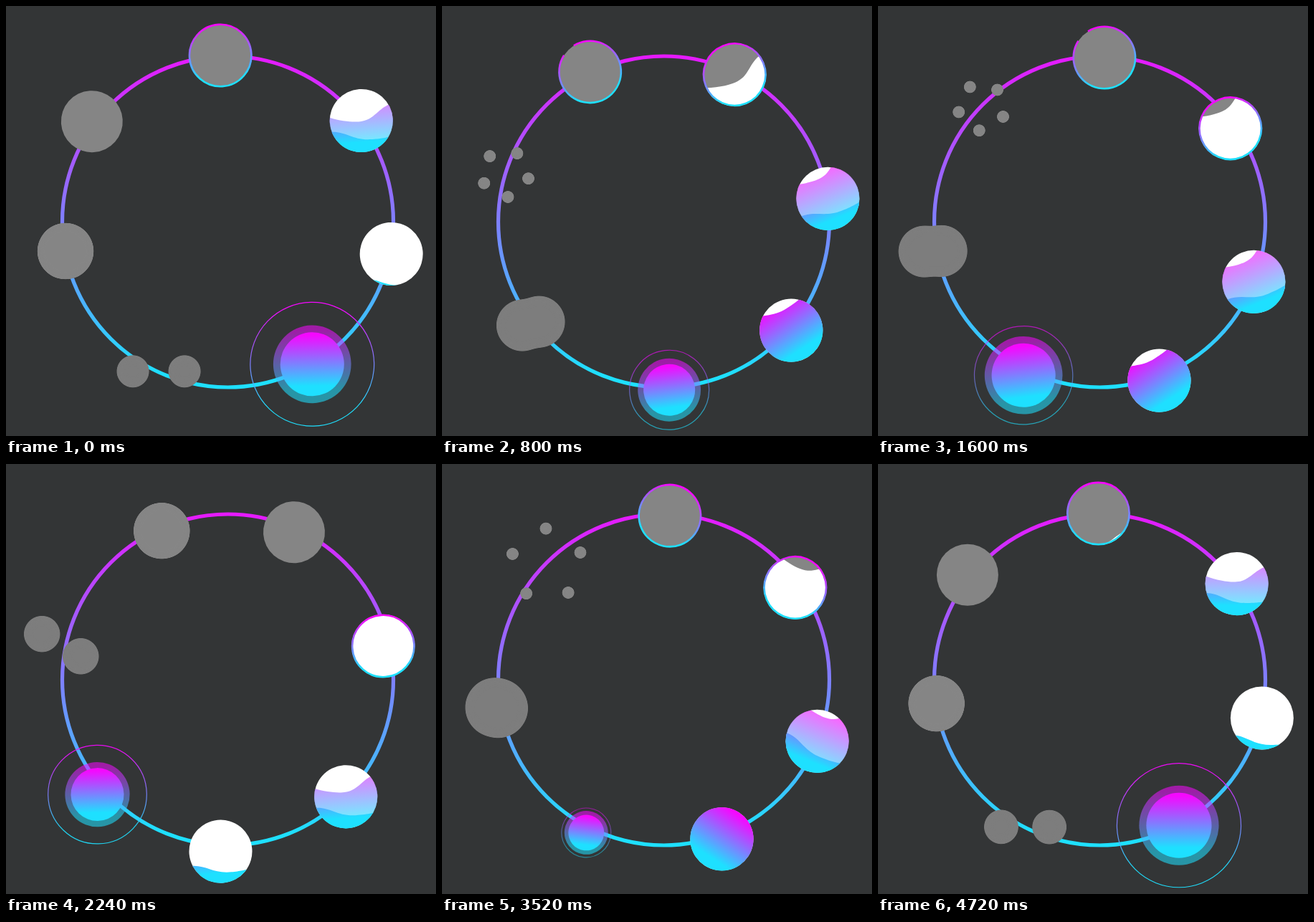
Animation of 600 by 600 pixels, one loop 4800 ms. Source, as an HTML page:

```html
<!DOCTYPE html>
<html lang="en">
<head>
<meta charset="utf-8">
<title>Orbit</title>
<style>
  html, body { margin: 0; height: 100%; overflow: hidden; background: #333536; }
  svg { display: block; width: 100vw; height: 100vh; }
  .gray { fill: #858585; }
  .tint { fill: url(#ball); }
  .rim { fill: none; stroke: url(#ball); stroke-width: 2.6; }
</style>
</head>
<body>
<svg viewBox="0 0 600 600">
  <defs>
    <linearGradient id="track" gradientUnits="userSpaceOnUse" x1="0" y1="70" x2="0" y2="515">
      <stop offset="0" stop-color="#e619ff"/><stop offset="1" stop-color="#1ee0ff"/>
    </linearGradient>
    <linearGradient id="ball" gradientUnits="userSpaceOnUse" x1="0" y1="-44" x2="0" y2="44">
      <stop offset=".04" stop-color="#f508ff"/><stop offset=".84" stop-color="#1ee0ff"/>
    </linearGradient>
    <linearGradient id="pulse" x1="0" y1="0" x2="0" y2="1">
      <stop offset=".05" stop-color="#f508ff"/><stop offset=".84" stop-color="#1ee0ff"/>
    </linearGradient>
    <filter id="gooBig" filterUnits="userSpaceOnUse" x="-100" y="-100" width="200" height="200" color-interpolation-filters="sRGB">
      <feGaussianBlur stdDeviation="6"/>
      <feColorMatrix values="1 0 0 0 0  0 1 0 0 0  0 0 1 0 0  0 0 0 18 -7"/>
    </filter>
    <filter id="gooSmall" filterUnits="userSpaceOnUse" x="-100" y="-100" width="200" height="200" color-interpolation-filters="sRGB">
      <feGaussianBlur stdDeviation="4"/>
      <feColorMatrix values="1 0 0 0 0  0 1 0 0 0  0 0 1 0 0  0 0 0 18 -7.5"/>
    </filter>
    <clipPath id="disc"><circle r="44"/></clipPath>
    <path id="crest" d="M-90 -12L-44 -7C-26 0 -8 2 0 1C20 0 26 -20 50 -22H90V140H-90Z"/>
    <path id="slope" d="M-90 -10L-44 -8C-22 -8 -14 6 12 6S36 3 90 -4V140H-90Z"/>
  </defs>

  <circle cx="309.5" cy="301" r="231" fill="none" stroke="url(#track)" stroke-width="5.2"/>

  <g id="whiten">
    <circle class="gray" r="43"/>
    <g clip-path="url(#disc)"><use id="milk" href="#crest" fill="#fff"/></g>
    <circle class="rim" r="43.2"/>
  </g>
  <g id="layers">
    <circle r="44" fill="#fff"/>
    <clipPath id="upperClip"><use id="upper" href="#crest"/></clipPath>
    <clipPath id="lowerClip"><use id="lower" href="#slope"/></clipPath>
    <circle class="tint" r="44.2" opacity=".62" clip-path="url(#upperClip)"/>
    <circle class="tint" r="44.2" clip-path="url(#lowerClip)"/>
  </g>
  <g id="fill">
    <circle r="44" fill="#fff"/>
    <clipPath id="fillClip"><use id="level" href="#slope"/></clipPath>
    <circle class="tint" r="44.2" clip-path="url(#fillClip)"/>
  </g>
  <g id="beat">
    <circle id="wave" fill="none" stroke="url(#pulse)" stroke-width="1.2"/>
    <circle id="halo" fill="url(#pulse)" opacity=".56"/>
    <circle id="core" fill="url(#pulse)"/>
  </g>
  <g id="pair" fill="#7d7d7d" filter="url(#gooBig)"><circle/><circle/></g>
  <g id="burst" class="gray" filter="url(#gooSmall)"><circle id="hub"/></g>
  <g id="draw">
    <circle class="gray" r="43"/>
    <path id="arc" class="rim"/>
  </g>
</svg>
<script>
const LOOP = 4800, STEP = 80;
const PEAK = 2690, REST = 4765, SWING = 95;   // the orbit turns back at PEAK
const CENTER = [300.8, 299], RAD = Math.PI / 180;

// id, start angle, orbit radius, share of the tilt
const nodes = [
  ["whiten", -90.4, 230, 1], ["layers", -35.5, 239.5, 1], ["fill", 11.2, 241.5, 1.5],
  ["beat", 57.8, 237.3, .3], ["pair", 112.6, 228.3, 0], ["burst", 168.8, 222, 0], ["draw", 217.3, 227.5, 1]
];

const $ = id => document.getElementById(id);
const set = (el, attrs) => { for (const k in attrs) el.setAttribute(k, attrs[k]); };
const lift = (id, y) => set($(id), { transform: `translate(0 ${y})` });
const clamp = (v, lo, hi) => Math.min(hi, Math.max(lo, v));
const polar = (r, deg) => [r * Math.cos(deg * RAD), r * Math.sin(deg * RAD)];

const dots = Array.from({ length: 5 }, () => {
  const dot = document.createElementNS("http://www.w3.org/2000/svg", "circle");
  $("burst").append(dot);
  return dot;
});

function arcPath(from, span, r) {
  if (span <= 0) return "";
  const end = from + Math.min(span, 359.9);
  return `M${polar(r, from)}A${r} ${r} 0 ${span > 180 ? 1 : 0} 1 ${polar(r, end)}`;
}

function render(t) {
  const deg = 360 * t / LOOP;
  const cos = a => Math.cos(a * RAD);
  const u = 1 - Math.abs(1 - t % 2400 / 1200);   // rises and falls twice a loop
  const turn = SWING * Math.max(0, Math.min(t / PEAK, (REST - t) / (REST - PEAK)));
  const tilt = clamp(-36 * Math.sin((deg + 6) * RAD), -22, 22);

  for (const [id, start, r, share] of nodes) {
    const [x, y] = polar(r, start + turn);
    set($(id), { transform: `translate(${CENTER[0] + x} ${CENTER[1] + y}) rotate(${tilt * share})` });
  }

  lift("milk", 46 - 1.3 * turn);
  lift("upper", -36 * Math.sin(u * Math.PI / 2));
  lift("lower", 21 - 9 * u * u);
  lift("level", 39 - 111 * u);

  const core = 36 + 8.8 * (cos(deg - 46) + cos(2 * deg + 74));
  set($("core"), { r: core });
  set($("halo"), { r: core * 1.22 });
  set($("wave"), { r: core * (1.94 - .6 * u), opacity: 1 - .55 * u });

  const gap = 72 * (1 - u);
  const lean = 8.3 + 21.5 * cos(deg - 214.5) + 10.4 * cos(2 * deg - 25);
  [...$("pair").children].forEach((c, i) => {
    const [cx, cy] = polar((i - .5) * gap, lean);
    set(c, { cx, cy, r: 42 - .277 * gap });
  });

  set($("hub"), { r: clamp(50 - 70 * u, 0, 39) });
  dots.forEach((dot, i) => {
    const [cx, cy] = polar(Math.max(0, 64 * u - 10), deg / 5 + 72 * i);
    set(dot, { cx, cy, r: 9 });
  });

  set($("arc"), { d: arcPath(-100, 360 * (u - .23) / .47, 43.2) });
}

const begin = performance.now();
function tick() {
  const t = (performance.now() - begin) % LOOP;
  render(Math.floor(t / STEP) * STEP);
  requestAnimationFrame(tick);
}
tick();
</script>
</body>
</html>
```
